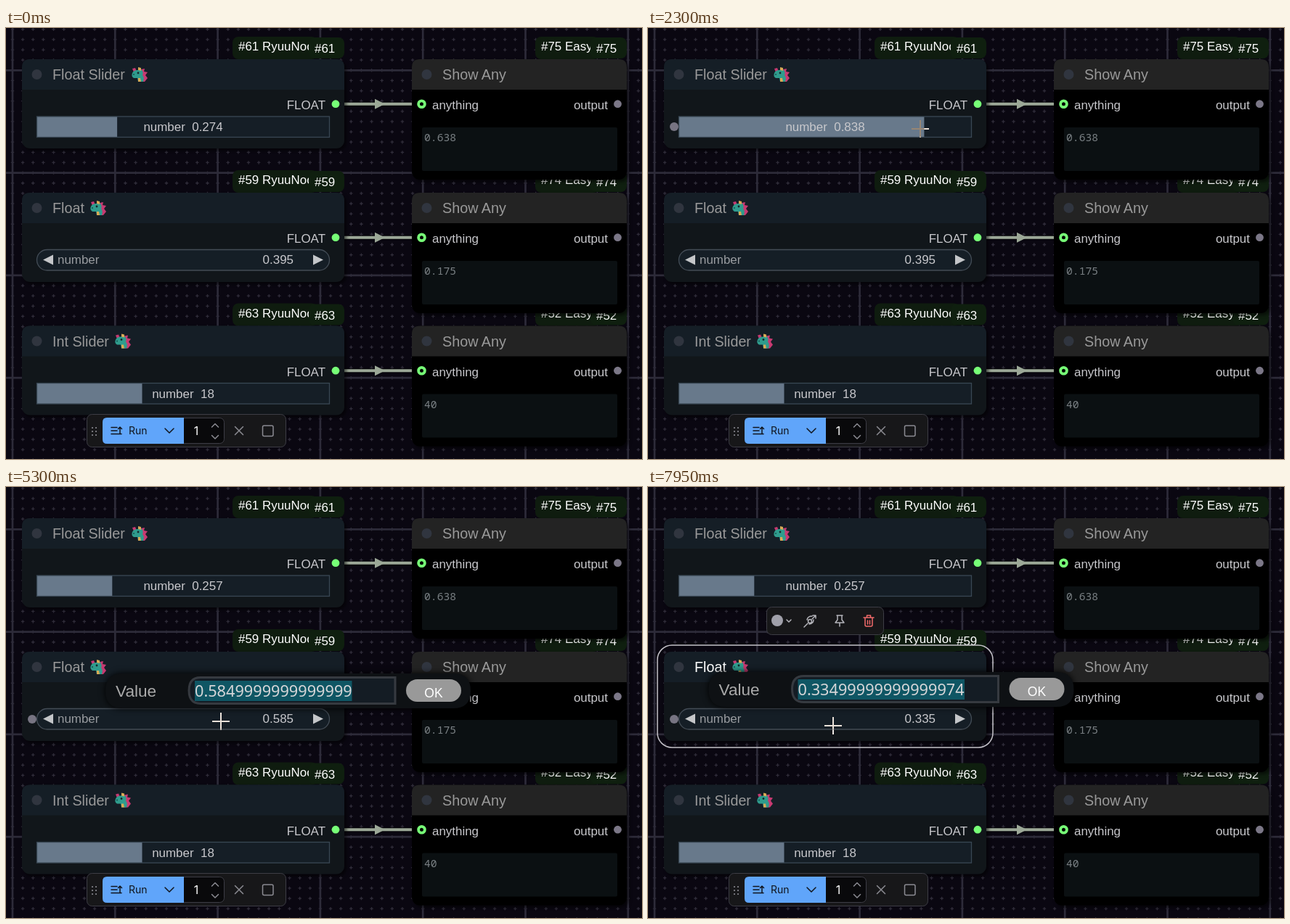
Animation of 876 by 594 pixels, one loop 8 s. Source, as an HTML page:

```html
<!DOCTYPE html>
<html lang="en">
<head>
<meta charset="utf-8">
<title>Node graph sliders</title>
<style>
html, body { margin: 0; width: 100%; height: 100%; overflow: hidden; background: #0a0711; }
svg { display: block; width: 876px; height: 594px; font: 16.95px 'Liberation Sans', Arial, sans-serif; }
text { white-space: pre; fill: #c8c8cc; }
.title { font-size: 19.75px; fill: #999; }
.selected .title { fill: #fff; }
.badge { fill: #fff; }
.mono { font: 14.7px 'Noto Sans Mono', monospace; fill: #7a8084; }
.ui { font: 14px Inter, sans-serif; fill: #10141c; }
.mid { text-anchor: middle; }
.end { text-anchor: end; }
.node { filter: drop-shadow(3px 3px 2px #0008); }
.panel { fill: #171719; stroke: #3d3d45; }
.icon { fill: none; stroke: #8b8b92; stroke-width: 1.5; stroke-linecap: round; stroke-linejoin: round; }
.dialog { filter: drop-shadow(0 0 5px #000); }
#cross { mix-blend-mode: difference; }
</style>
</head>
<body>
<svg id="stage" viewBox="0 0 876 594" xmlns="http://www.w3.org/2000/svg">
<defs>
  <g id="dragon">
    <path d="M13 4 18 3 17 7 22 8 19 12 22 16 18 21H12L10 8Z" fill="#c73a72"/>
    <path d="M1 3 5 2 7 7 3 8Z" fill="#c73a72"/>
    <path d="M1 9Q3 5 8 5L13 4Q17 7 15 12 18 15 16 21H9L8 16H3Q-1 14 1 9Z" fill="#2f9c8d"/>
    <path d="M9 1 13 2 13 6 9 5ZM9 16 12 16 13 21H9Z" fill="#d9ab55"/>
    <circle cx="9" cy="9" r="1.4" fill="#14282c"/>
    <circle cx="3" cy="11" r="1" fill="#14514e"/>
  </g>
</defs>
</svg>
<script>
const LOOP = 8000, FRAME = 50;
const ROWS = [0, 184, 367.5];
const SLOT_Y = 104.7;
const stage = document.getElementById('stage');
const $ = id => document.getElementById(id);

const rect = (x, y, w, h, r, attrs) => `<rect x="${x}" y="${y}" width="${w}" height="${h}" rx="${r}" ${attrs}/>`;
const dot = (x, y, r, fill, attrs = '') => `<circle cx="${x}" cy="${y}" r="${r}" fill="${fill}" ${attrs}/>`;
const text = (x, y, s, cls = '', attrs = '') => `<text x="${x}" y="${y}" class="${cls}" ${attrs}>${s}</text>`;
const path = (d, attrs) => `<path d="${d}" ${attrs}/>`;
const icon = (d, attrs = '') => path(d, `class="icon" ${attrs}`);

function background() {
  const x0 = 9, y0 = 58.3, step = 14.13;
  let marks = '', lines = '';
  for (let i = -1; i < 63; i++) for (let j = -5; j < 39; j++) {
    const x = x0 + i * step, y = y0 + j * step;
    marks += `M${x - 2.2} ${y}h4.4M${x} ${y - 2.2}v4.4`;
  }
  for (let i = 0; i < 7; i++) {
    const d = i * step * 10;
    lines += `M${x0 + d} 0V594M0 ${y0 + d}H876`;
  }
  return path(marks, 'stroke="#302d3a" stroke-width="1.3"') + path(lines, 'stroke="#2d2b39" stroke-width="2.7"');
}

function badges(x, split, right, label, id) {
  return rect(x, 12, split - x + 12, 31, 8, 'fill="#0f1c0f"') +
    text(x + 8, 31, `${id} ${label}`, 'badge') +
    rect(split, 13, right - split, 29, 8, 'fill="#0f1f0f"') +
    text(split + 8, 34, id, 'badge');
}

function frame(x, w, h, head, body, title) {
  return rect(x, 43, w, h, 11, `fill="${body}" class="node"`) +
    path(`M${x} 85V54q0-11 11-11H${x + w - 11}q11 0 11 11V85Z`, `fill="${head}"`) +
    dot(x + 20.5, 64, 7, '#30353f') + text(x + 42, 71, title, 'title');
}

function slider(id, fillWidth, label) {
  return rect(42.5, 122, 403, 28.5, 0, 'fill="#151e26"') +
    `<rect id="${id}Fill" x="43" y="122" width="${fillWidth}" height="28.5" fill="#68798b"/>` +
    rect(42.5, 122, 403, 28.5, 0, 'fill="none" stroke="#394754" stroke-width="1.3"') +
    text(244, 142, label, 'mid', `id="${id}Text"`);
}

function numberBox() {
  return rect(42.5, 121.5, 403, 28.5, 14.2, 'fill="#151e26" stroke="#434c56" stroke-width="1.3"') +
    path('M51 135.5 65 128.5V142.5ZM437 135.5 423 128.5V142.5Z', 'fill="#c4c6c9"') +
    text(71, 141, 'number', '', 'style="fill:#9a9da1"') + text(396, 141, '0.395', 'end', 'id="number"');
}

function source(row, title, emojiX, id, widget) {
  return `<g id="source${row}" transform="translate(0 ${ROWS[row]})">` +
    badges(312, 417, 466, 'RyuuNoo', id) +
    frame(22, 444, 123, '#151e26', '#11161a', title) +
    `<use href="#dragon" x="${emojiX}" y="53"/>` +
    text(440, 112, 'FLOAT', 'end') + dot(454, SLOT_Y, 5.4, '#7f7') + widget +
    dot(36, 136, 6, '#777482', `id="hover${row}" visibility="hidden"`) + '</g>';
}

function viewer(row, id, value) {
  return `<g transform="translate(0 ${ROWS[row]})">` +
    badges(729, 805, 855, 'Easy', id) +
    frame(559, 296, 166, '#232323', '#000', 'Show Any') +
    dot(572.5, SLOT_Y, 4.4, '#000', 'stroke="#7f7" stroke-width="3.8"') + text(587, 112, 'anything') +
    text(829, 112, 'output', 'end') + dot(842.5, SLOT_Y, 5.4, '#7b7787') +
    rect(573, 137, 269, 60, 2, 'fill="#0b1012"') + text(576, 156, value, 'mono') + '</g>';
}

const links = ROWS.map(row => {
  const y = row + SLOT_Y;
  return path(`M454 ${y}H572`, 'stroke="#0007" stroke-width="7"') +
    path(`M454 ${y}H572`, 'stroke="#9ca897" stroke-width="4"') +
    path(`M508 ${y - 7}V${y + 7}L522 ${y}Z`, 'fill="#9ca897"');
}).join('');

function runBar() {
  const dark = 'style="stroke:#10141c"';
  let grip = '';
  for (const x of [119, 124]) for (const y of [551, 556, 561]) grip += dot(x, y, 1.1, '#8b8b92');
  return rect(111.5, 532.5, 274, 45, 7, 'class="panel"') + grip +
    rect(240, 537.5, 60.5, 35, 6, 'fill="#09090b" stroke="#3d3d45"') +
    path('M139 537H245V573H139q-6 0-6-6V543q0-6 6-6Z', 'fill="#60a5fa"') +
    icon('M145 550.5h8M145 555h8M145 559.5h14M157 559V550M154.5 552.5 157 550l2.5 2.5', dark) +
    text(169, 560, 'Run', 'ui') +
    icon('M219 552l6 6 6-6', dark) +
    text(262, 561, '1', 'ui mid', 'style="fill:#fff;font-size:16px"') +
    icon('M283.5 550l4.5-4.5 4.5 4.5M283.5 561.5l4.5 4.5 4.5-4.5') +
    icon('M315.5 549.5l11 11M326.5 549.5l-11 11') +
    rect(353.5, 548, 14.5, 14.5, 2, 'class="icon"');
}

function selection() {
  const light = 'style="stroke:#b4b4ba"', red = 'style="stroke:#f26b6b"';
  return '<g id="selection">' +
    rect(13, 218, 462, 141, 20, 'fill="none" stroke="#c4c2c8" stroke-width="1.5"') +
    rect(163.5, 165.5, 161, 38, 7, 'class="panel"') +
    dot(178, 184, 8, '#a0a0aa') + icon('M191 183l3 3 3-3', light) +
    icon('M215 193l5-5M226 182l5-5M227 177h4v4M219 183q1-5 7-5M222 189q6-1 6-6', light) +
    dot(223, 185, 2.5, 'none', 'stroke="#b4b4ba" stroke-width="1.5"') +
    icon('M260 177h8M261 177v6l-3 4h12l-3-4v-6M264 187v5', light) +
    icon('M297 180h14M299 180v10q0 2 2 2h6q2 0 2-2V180M301.5 180v-3h5v3M302.5 184v5M305.5 184v5', red) + '</g>';
}

function dialog() {
  return '<g id="dialog"><path class="dialog" d="M161 257H616q24 0 24 24t-24 24H161q-24 0-24-24t24-24Z" fill="#0e1114"/>' +
    text(151, 289, 'Value', '', 'style="font-size:22.6px;fill:#aaa"') +
    path('M536 262.5V298.5H268q-16 0-16-18t16-18Z', 'fill="#141c24" stroke="#363a40" stroke-width="3"') +
    '<rect id="mark" x="260" y="267" height="28" fill="#0f5664"/>' +
    text(260, 289, '', '', 'id="entry" style="font:21.7px \'Noto Sans\',sans-serif;fill:#d6d6d8"') +
    rect(551, 265, 76, 31, 15.5, 'fill="#999"') +
    text(589, 290, 'OK', 'mid', 'style="font-size:17.5px;fill:#fff"') + '</g>';
}

const cursor =
  '<g id="cross" fill="#fff"><rect x="-12" y="-1" width="24" height="2"/><rect x="-1" y="-12" width="2" height="24"/></g>' +
  path('M0 0V16.5L3.800 13 6.5 19 9 18 6.4 12H11.5Z', 'id="arrow" fill="#fff" stroke="#000"');

stage.insertAdjacentHTML('beforeend', background() + links +
  source(0, 'Float Slider', 173, '#61', slider('float', 110, 'number  0.274')) +
  source(1, 'Float', 116, '#59', numberBox()) +
  source(2, 'Int Slider', 150, '#63', slider('int', 144.5, 'number  18')) +
  viewer(2, '#52', '40') + viewer(1, '#74', '0.175') + viewer(0, '#75', '0.638') +
  runBar() + selection() + dialog() + cursor);

// Pointer path: time, x, y
const POINTER = [
  [500, 831, 556], [600, 700, 380], [750, 480, 60], [900, 260, 90], [1050, 165, 138], [1150, 153.1, 140],
  [1250, 190, 142], [1300, 233.3, 142], [1350, 266, 143], [1500, 325, 142], [1700, 362, 140], [1950, 380.4, 139],
  [2250, 380.4, 139], [2300, 375, 139], [2700, 290, 141], [3100, 193, 145], [3150, 182.1, 147], [3200, 149, 149],
  [3250, 146.3, 149], [3400, 146.3, 149], [3450, 146.3, 150], [3750, 146.3, 150], [4100, 330, 300],
  [4250, 372, 366], [4450, 264, 321], [4500, 259, 318], [4600, 277, 322], [4850, 296, 323], [5800, 296, 323],
  [6050, 296, 352], [6200, 296, 352], [6350, 262.3, 318], [6650, 237.3, 312], [6850, 237.3, 312],
  [7000, 242.5, 321], [7850, 242.5, 321], [7950, 255, 329]
];

function pointer(t) {
  const i = POINTER.findIndex(k => k[0] >= t);
  if (i < 1) return (i ? POINTER.at(-1) : POINTER[0]).slice(1);
  const [a, b] = [POINTER[i - 1], POINTER[i]], p = (t - a[0]) / (b[0] - a[0]);
  return [a[1] + (b[1] - a[1]) * p, a[2] + (b[2] - a[2]) * p];
}

// Widgets react one frame after the pointer.
const dragX = (t, from, to) => pointer(Math.min(Math.max(t - FRAME, from), to))[0];
const show = (id, on) => $(id).setAttribute('visibility', on ? 'visible' : 'hidden');
const move = (id, x, y) => $(id).setAttribute('transform', `translate(${x} ${y})`);
const inside = (x, y, left, right, height) =>
  ROWS.findIndex(top => x >= left && x <= right && y >= top + 43 && y <= top + 43 + height);

function draw(t) {
  const [x, y] = pointer(t);
  const over = inside(x, y, 22, 466, 123);
  const crosshair = over >= 0 || inside(x, y, 559, 855, 166) >= 0;
  move('cross', Math.round(x), Math.round(y));
  move('arrow', Math.round(x), Math.round(y));
  show('cross', t >= 500 && crosshair);
  show('arrow', t >= 500 && !crosshair);
  ROWS.forEach((_, i) => show('hover' + i, t >= 500 && over === i));

  const fillX = dragX(t, 1150, 3300);
  $('floatFill').setAttribute('width', fillX - 43);
  $('floatText').textContent = 'number  ' + ((fillX - 42.7) / 403).toFixed(3);

  const steps = Math.round(dragX(t, 4600, 4900) - 277) + Math.round(dragX(t, 6350, 6650) - 262.3);
  $('number').textContent = (.395 + steps * .01).toFixed(3);

  const selected = t >= 6350, second = t >= 7200;
  show('selection', selected);
  $('source1').classList.toggle('selected', selected);

  show('dialog', second || (t >= 5300 && t < 6150));
  move('dialog', second ? -53.5 : 0, second ? -2 : 0);
  $('entry').textContent = second ? '0.33499999999999974' : '0.5849999999999999';
  $('mark').setAttribute('width', second ? 229.5 : t < 6100 ? 216.5 : 0);
}

const start = performance.now();
function tick() {
  const t = (performance.now() - start) % LOOP;
  draw(Math.floor(t / FRAME) * FRAME);
  requestAnimationFrame(tick);
}
tick();
</script>
</body>
</html>
```
